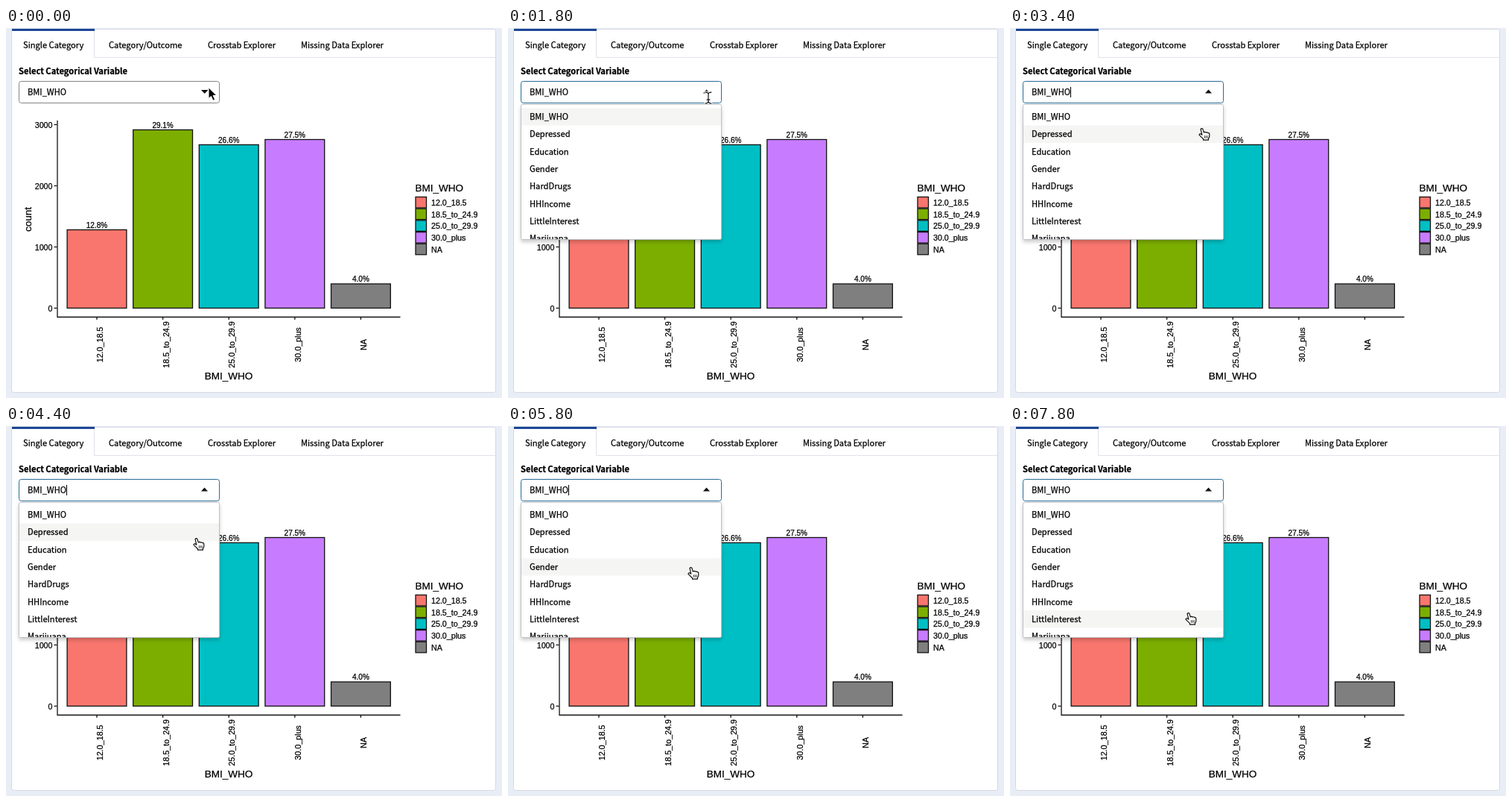
An HTML page that plays this animation: 666 px wide and 496 px high, repeating every 8000 ms.

```html
<!DOCTYPE html>
<html lang="en">
<head>
<meta charset="utf-8">
<title>Category explorer</title>
<style>
  html, body { margin: 0; width: 100%; height: 100%; overflow: hidden; background: #e9edf6; }
  svg { display: block; width: 666px; height: 496px; }
  text { fill: #000; stroke: #000; stroke-width: .25; }
  .ui { font: 11.15px "Noto Sans CJK SC", "Noto Sans CJK JP", "Noto Sans CJK", "Noto Sans", sans-serif; }
  .bold { font-weight: 700; }
  .plot { font: 10.7px "Liberation Sans", Arial, sans-serif; }
  .plot .title { font-size: 13.5px; }
  .plot .percent { font-size: 10px; }
  .ink { stroke: #111; stroke-width: 1.3; }
  .pointer { stroke-linejoin: round; stroke-linecap: round; }
</style>
</head>
<body>
<svg viewBox="0 0 666 496">
  <defs>
    <filter id="shadow" x="-10%" y="-10%" width="120%" height="125%">
      <feDropShadow dx="0" dy="3" stdDeviation="2.5" flood-opacity=".2"/>
    </filter>
    <clipPath id="listClip"><rect x="18" y="103" width="268" height="180"/></clipPath>
  </defs>

  <rect x="7.5" y="1.5" width="650" height="487" rx="3" fill="#fff" stroke="#d3d8e2"/>
  <path d="M118.5 3V39.5H657" fill="none" stroke="#dfe3ea"/>
  <rect x="8" y="1" width="111" height="3" fill="#1c4595"/>
  <g class="ui" id="tabs"></g>
  <text class="ui bold" x="17" y="62">Select Categorical Variable</text>

  <g class="plot" id="plot" transform="translate(-.5 -.5)"></g>

  <rect id="field" x="17.5" y="71.5" width="269" height="29" rx="3" fill="#fff"/>
  <text class="ui" x="29" y="90">BMI_WHO</text>
  <path id="arrow" fill="#111"/>
  <rect id="caret" x="81" y="79" width="1" height="14" fill="#000"/>

  <g id="list">
    <rect x="17.5" y="102.5" width="269" height="181" rx="2" fill="#fff" stroke="#bdc1c6" filter="url(#shadow)"/>
    <g clip-path="url(#listClip)">
      <rect id="highlight" x="18" width="268" height="23.3" fill="#f5f5f4"/>
      <g class="ui" id="options"></g>
    </g>
  </g>

  <g id="pointer" class="pointer">
    <path id="plain" d="M0 0V14.5L3.4 11.5L6 17.3L8.6 16.1L6.1 10.5H10.6Z" fill="#000" stroke="#fff"/>
    <g id="beam" fill="none">
      <path d="M-4-8Q0-8 0-5Q0-8 4-8M0-5V4M-4 7Q0 7 0 4Q0 7 4 7M-2 2H2" stroke="#fff" stroke-width="3"/>
      <path d="M-4-8Q0-8 0-5Q0-8 4-8M0-5V4M-4 7Q0 7 0 4Q0 7 4 7M-2 2H2" stroke="#111" stroke-width="1.2"/>
    </g>
    <g id="hand" stroke="#111" stroke-width="1.3" transform="translate(-.5 -1) scale(.92)">
      <path d="M-1.6 1.2Q0-1 1.6 1.2L3 6Q5 4.5 6 6.2Q8 5 9 6.8Q11.2 6.2 11.2 9V11.5Q11 14 9.7 15V17H2.2V15.4L-3.8 9.6Q-3.6 7.4-1.3 8.3L.4 9.5Z" fill="#fff"/>
      <path d="M4.2 11V14M6.3 11V14M8.4 11V14" fill="none" stroke-width=".9"/>
    </g>
  </g>
</svg>
<script>
const LOOP = 8000, OPEN_AT = 800, ROW_TOP = 107.4, ROW = 23.3;
const $ = id => document.getElementById(id);
const show = (id, on) => $(id).setAttribute('display', on ? 'inline' : 'none');
const text = (x, y, label, attrs = '') => `<text x="${x}" y="${y}" ${attrs}>${label}</text>`;
const turned = (x, y, label, attrs = '') =>
  `<text transform="translate(${x} ${y}) rotate(-90)" text-anchor="middle" ${attrs}>${label}</text>`;

const tabs = [['Single Category', 23], ['Category/Outcome', 138],
  ['Crosstab Explorer', 271], ['Missing Data Explorer', 396]];
$('tabs').innerHTML = tabs.map(([label, x]) => text(x, 26.5, label)).join('');

const options = ['BMI_WHO', 'Depressed', 'Education', 'Gender', 'HardDrugs',
  'HHIncome', 'LittleInterest', 'Marijuana'];
$('options').innerHTML = options.map((label, i) => text(29, 123 + i * ROW, label)).join('');

const bars = [
  ['12.0_18.5', '12.8%', 271, '#f8766d'],
  ['18.5_to_24.9', '29.1%', 137, '#7cae00'],
  ['25.0_to_29.9', '26.6%', 157, '#00bfc4'],
  ['30.0_plus', '27.5%', 150, '#c77cff'],
  ['NA', '4.0%', 343.5, '#7f7f7f']];

function drawPlot() {
  const base = 376, middle = 'text-anchor="middle"';
  let out = '<path class="ink" fill="none" d="M69.500 124.500V388H530"/>';
  for (let i = 0; i < 4; i++) {
    const y = base - i * 82;
    out += `<path class="ink" d="M65 ${y}H69"/>` + text(63, y + 4, i * 1000, 'text-anchor="end"');
  }
  bars.forEach(([label, percent, top, color], i) => {
    const x = 122.5 + i * 88.6, keyY = 227 + i * 15.7;
    out += `<rect class="ink" x="${x - 39.9}" y="${top}" width="79.8" height="${base - top}" fill="${color}"/>`
      + text(x, top - 3, percent, `class="percent" ${middle}`)
      + `<path class="ink" d="M${x} 388V391.500"/>`
      + turned(x + 8, 425, label)
      + `<rect class="ink" x="550.5" y="${keyY}" width="14.5" height="14.5" fill="${color}"/>`
      + text(571.5, keyY + 11.4, label);
  });
  return out + text(299.5, 471, 'BMI_WHO', `class="title" ${middle}`)
    + turned(34, 257, 'count', 'class="title"')
    + text(550, 219.5, 'BMI_WHO', 'class="title"');
}
$('plot').innerHTML = drawPlot();

// Pointer hot spot: time, x, y
const path = [[0, 272, 80], [800, 272, 82], [1800, 269, 94], [3400, 258, 135.5], [4400, 256, 151.5],
  [5800, 246, 190.5], [7000, 242.5, 238.5], [7800, 240, 251.5], [LOOP, 240, 251.5]];

function pointerAt(t) {
  const i = path.findIndex(p => p[0] > t);
  const [t0, x0, y0] = path[i - 1], [t1, x1, y1] = path[i];
  const k = (t - t0) / (t1 - t0);
  return [x0 + (x1 - x0) * k, y0 + (y1 - y0) * k];
}

function render(t) {
  const open = t >= OPEN_AT, [x, y] = pointerAt(t), overList = open && y > 104;
  const row = Math.max(0, Math.floor((y - ROW_TOP) / ROW));
  $('field').setAttribute('stroke', open ? '#286b94' : '#858585');
  $('arrow').setAttribute('d', open ? 'M262 87.500H271L266.500 82.500Z' : 'M262 83H271.500L266.700 88Z');
  $('highlight').setAttribute('y', ROW_TOP + row * ROW);
  $('pointer').setAttribute('transform', `translate(${x} ${y})`);
  show('list', open);
  show('caret', open && (t + 500) % 1200 < 600);
  show('plain', !open);
  show('beam', open && !overList);
  show('hand', overList);
}

function tick() {
  render(performance.now() % LOOP);
  requestAnimationFrame(tick);
}
tick();
</script>
</body>
</html>
```
